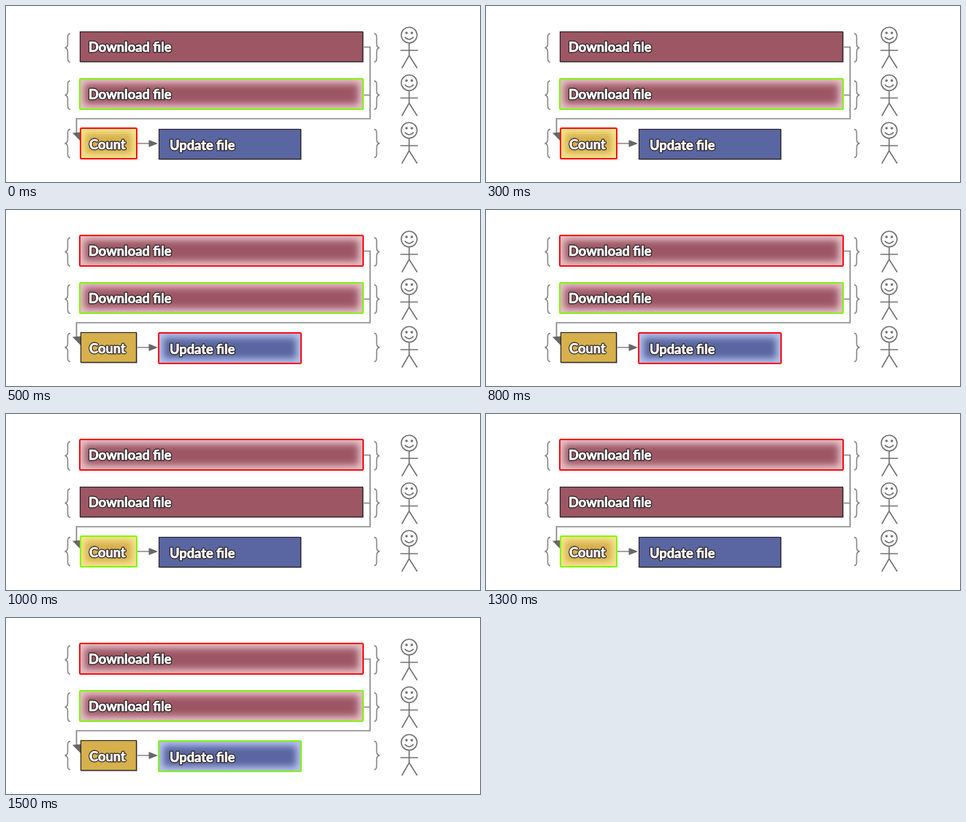
Recreate the animation shown at these times as an HTML page. Size 649x242 px, loop 2 s.

```html
<!DOCTYPE html>
<html lang="en">
<head>
<meta charset="utf-8">
<title>Parallel tasks</title>
<style>
  html, body { margin: 0; width: 100%; height: 100%; overflow: hidden; background: #fff; }
  svg { display: block; }
  .line { fill: none; stroke: #858585; stroke-width: 1.7; }
  .head { fill: #666; }
  .brace { fill: none; stroke: #858585; stroke-width: 1.6; }
  .man { fill: none; stroke: #737373; stroke-width: 1.6; }
  text { font: 700 18.3px Lato, sans-serif; stroke-linejoin: round; }
  .rim { fill: #2b2024; stroke: #2b2024; stroke-width: 3; }
  .face { fill: #fff; stroke: #fff; stroke-width: .7; }
</style>
</head>
<body>
<svg id="stage" width="649" height="242" viewBox="0 0 649 242">
  <defs>
    <filter id="soft" x="-20%" y="-70%" width="140%" height="240%">
      <feGaussianBlur stdDeviation="4.6"/>
    </filter>
  </defs>
</svg>
<script>
const stage = document.getElementById('stage');
const RED = '#fb0d12', GREEN = '#80f70c';
const STEP = 500;

function add(tag, attrs, parent = stage) {
  const el = document.createElementNS('http://www.w3.org/2000/svg', tag);
  for (const key in attrs) el.setAttribute(key, attrs[key]);
  parent.appendChild(el);
  return el;
}

function brace(x, y, dir) {
  const p = (dx, dy) => `${x + dir * dx} ${y + dy}`;
  add('path', {
    class: 'brace',
    d: `M${p(7.5, 0)}Q${p(4, 0)} ${p(4, 5)}V${y + 14}Q${p(4, 19)} ${p(0, 19.5)}` +
       `Q${p(4, 20)} ${p(4, 25)}V${y + 34}Q${p(4, 39)} ${p(7.5, 39)}`
  });
}

function person(y) {
  const g = add('g', { class: 'man', transform: `translate(552 ${y})` });
  add('circle', { r: 10.8 }, g);
  add('path', { d: 'M-6 2.5Q0 9.5 6 2.5M0 11V28L-10 45.5M0 28L11 45.5M-12 21H12' }, g);
  for (const x of [-3.7, 3.7]) add('circle', { cx: x, cy: -3, r: 1, fill: '#737373' }, g);
}

// cues: outline colour in each half-second step, null when idle
function box(id, x, y, width, height, fill, glow, label, tx, ty, cues) {
  const area = { x, y, width, height };
  const clip = add('clipPath', { id }, stage.querySelector('defs'));
  add('rect', area, clip);

  const idle = add('g', {});
  add('rect', { x: x + 1, y: y + 1, width, height, fill: '#bbb' }, idle);
  add('rect', {
    x: x + .5, y: y + .5, width: width - 1, height: height - 1,
    fill, stroke: '#2b2226', 'stroke-width': 1.2
  }, idle);

  const active = add('g', {});
  add('rect', { ...area, fill }, active);
  const inner = add('g', { 'clip-path': `url(#${id})` }, active);
  add('rect', {
    ...area, fill: 'none', stroke: glow, 'stroke-width': 13,
    filter: 'url(#soft)', opacity: .82
  }, inner);
  const edge = add('rect', { ...area, rx: 1.5, fill: 'none', 'stroke-width': 2 }, active);

  for (const layer of ['rim', 'face'])
    add('text', { class: layer, x: tx, y: ty }).textContent = label;

  return step => {
    const cue = cues[step];
    idle.style.display = cue ? 'none' : '';
    active.style.display = cue ? '' : 'none';
    if (cue) edge.setAttribute('stroke', cue);
  };
}

[[38, 40], [103, 105.5], [169.5, 171]].forEach(([top, face]) => {
  brace(80.5, top, 1);
  brace(511.5, top, -1);
  person(face);
});

add('path', { class: 'line', d: 'M489 56.5H498.5V155H96.5V177M489 122.5H498.5M180 189H198' });
add('path', { class: 'head', d: 'M91 174.5L102 173.5L103 187ZM195.5 184L208 189L195.5 194Z' });

const rose = '#9d5764', pink = '#f9dde1';
const boxes = [
  box('a', 101, 35, 388, 42, rose, pink, 'Download file', 113, 62.5, [null, RED, RED, RED]),
  box('b', 101, 100, 388, 42, rose, pink, 'Download file', 113, 127.5, [GREEN, GREEN, null, GREEN]),
  box('c', 102, 168, 77, 42, '#d6b04c', '#fff3a0', 'Count', 114, 196.5, [RED, null, GREEN, null]),
  box('d', 209, 169, 195, 42, '#5966a1', '#cfd9ff', 'Update file', 224, 197.5, [null, RED, null, GREEN])
];

function draw(ms) {
  const step = Math.floor(ms / STEP) % 4;
  boxes.forEach(show => show(step));
}

const start = performance.now();
function tick() {
  draw(performance.now() - start);
  requestAnimationFrame(tick);
}
draw(0);
requestAnimationFrame(tick);
</script>
</body>
</html>
```
